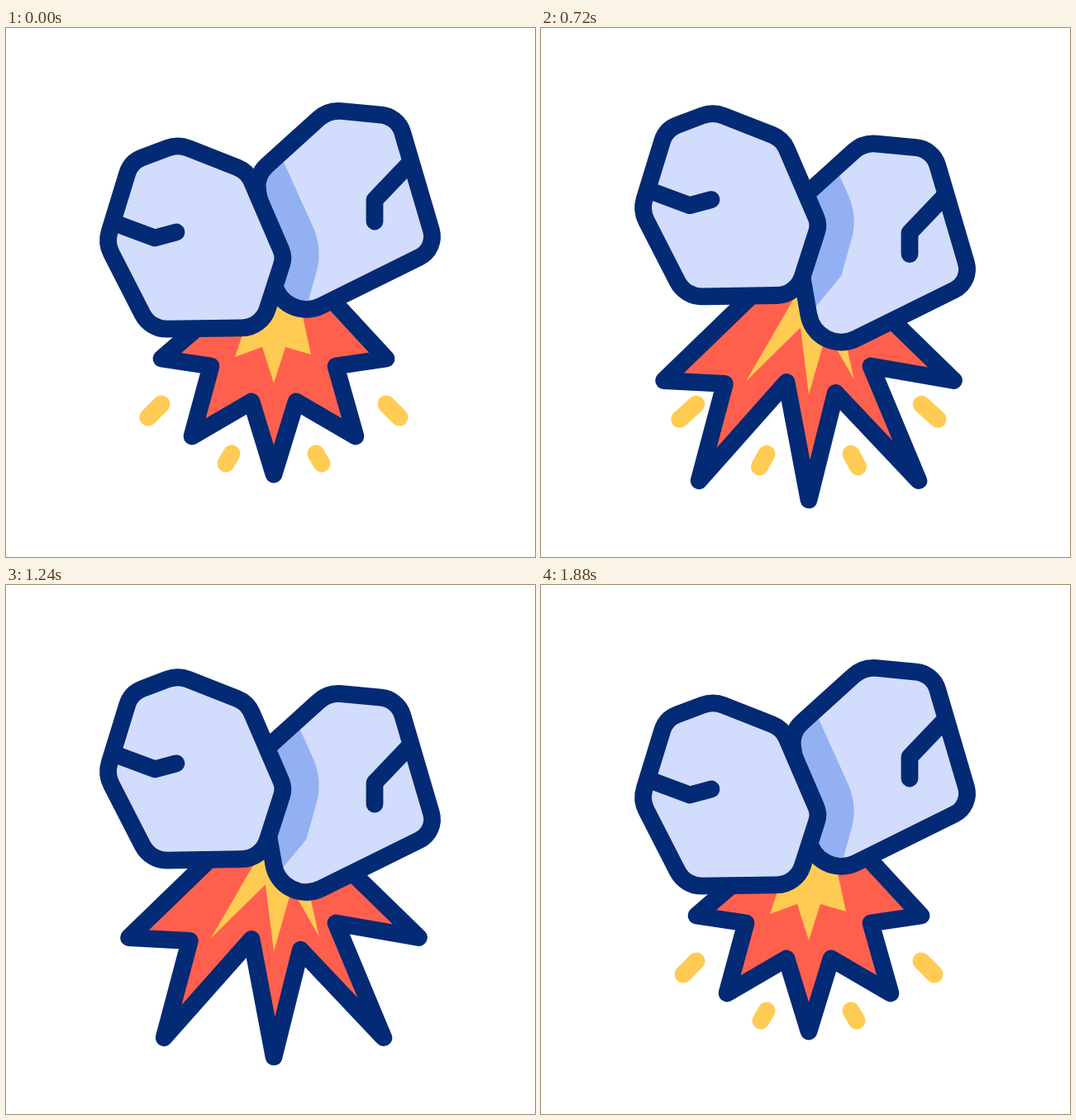
These frames come from a looping animation (640x640 px, 2.4 s). An HTML page with a canvas:

```html
<!DOCTYPE html>
<html lang="en">
<head>
<meta charset="utf-8">
<title>Striking stones</title>
<style>
html, body { margin: 0; width: 100%; height: 100%; overflow: hidden; background: #fff; }
canvas { display: block; width: 100%; height: 100%; }
</style>
</head>
<body>
<canvas id="stage" width="640" height="640"></canvas>
<script>
const ctx = document.getElementById('stage').getContext('2d');
const LOOP = 2400, ACTIVE = 1880, STEP = 20, BEAT = ACTIVE / 7;
const NAVY = '#032a74', STONE = '#d2dcfc', SHADE = '#93b1f2', RED = '#ff604e', GOLD = '#ffcb52';
const LINE = 20.8, MID = 324;

const mix = (a, b, k) => a + (b - a) * k;
const clamp = v => Math.max(0, Math.min(1, v));
const sine = u => (1 - Math.cos(Math.PI * clamp(u))) / 2;
const power = (u, n) => u < .5 ? (2 * u) ** n / 2 : 1 - (2 - 2 * u) ** n / 2;
const mirror = ([x, y]) => [2 * MID - x, y];

function polygon(pts) {
  const p = new Path2D();
  pts.forEach(([x, y]) => p.lineTo(x, y));
  return p;
}

// Closed polygon, each corner given as x, y, radius
function rounded(pts) {
  const p = new Path2D(), [a, b] = [pts[pts.length - 1], pts[0]];
  p.moveTo((a[0] + b[0]) / 2, (a[1] + b[1]) / 2);
  pts.forEach(([x, y, r], i) => {
    const n = pts[(i + 1) % pts.length];
    p.arcTo(x, y, n[0], n[1], r);
  });
  p.closePath();
  return p;
}

const leftStone = rounded([[208, 140.5, 35], [292, 173.5, 32], [336.5, 277, 25], [309, 362.5, 33],
  [174.5, 364.5, 33], [121, 260, 35], [151, 162, 30]]);
const rightStone = rounded([[390, 99, 36], [474, 107, 30], [521, 267, 28], [333, 360, 40], [301.5, 179, 34]]);
const leftCrack = polygon([[137, 238], [180, 254], [206, 247]]);
const rightCrack = polygon([[488, 164], [446, 208], [446, 234]]);
const shadow = new Path2D('M270 100L305 120Q325 140 335 160L372 242Q382 265 377 290L365 333Q364 339 360 343L331 378H270Z');

// A corner rests at x, y, moves by gx, gy as the fire opens and by dx, dy as it dips
const corner = (x, y, gx = 0, gy = 0, dx = 0, dy = 0) =>
  (open, dip) => [x + open * (gx + dx * dip), y + open * (gy + dy * dip)];
const flip = c => (open, dip) => mirror(c(open, dip));

const sideTip = corner(188, 400, -66, 18, 28, 9);
const lowTip = corner(225, 494, -68, 85, 36, -33);
const flame = [
  corner(316, 290, 4, 0, -32),
  sideTip, corner(248, 409, -19, 12, -7, 10),
  lowTip, corner(297, 452, 0, 1, 0, -26),
  corner(MID, 540, 0, 85, 0, -57), corner(351, 452, 12, 32, -7, -45),
  flip(lowTip), corner(399, 409),
  flip(sideTip), corner(352, 283)
];
const core = [
  corner(313, 290, 5, 0, 10),
  corner(277, 398, -29, 55, 0, -27), corner(310, 386, 1, -12, 3, -12),
  corner(MID, 430, 0, 36, 0, -24), corner(338, 386, 5, 29, 3, -50),
  corner(369, 395, 25, 71, -16, -43), corner(345, 285, -10, 0, 13)
];
const flares = [356, 889, 1369], FALL = 310;

// Each spark: inner end, outer end, vanishing point
const sparks = [[[188, 455], [172, 471], [81, 523]], [[273, 515], [266, 527], [231, 611.5]]];
const bursts = [0, 630, ACTIVE];

function ink(path, width = LINE, color = NAVY) {
  ctx.strokeStyle = color;
  ctx.lineWidth = width;
  ctx.stroke(path);
}

function fill(path, color) {
  ctx.fillStyle = color;
  ctx.fill(path);
}

// Stones swing from rest between both ends and back to rest
function swing(t, first, second) {
  const n = Math.min(6, Math.floor(t / BEAT));
  const at = k => k % 7 === 0 ? 0 : k % 2 ? first : second;
  return mix(at(n), at(n + 1), power(clamp(t / BEAT - n), 4));
}

// Zero at each flare, sinking after it and rising to the next
function dipAt(t) {
  const i = flares.filter(f => f <= t).length;
  if (!i) return 0;
  const low = flares[i - 1] + FALL;
  if (t < low || i === flares.length) return 1.1 * sine((t - low + FALL) / FALL);
  return 1.1 * (1 - sine((t - low) / (flares[i] - low)));
}

function drawFlame(t) {
  const open = sine(t / 360) * (1 - sine((t - 1660) / 220)), dip = dipAt(t);
  const shape = corners => polygon(corners.map(c => c(open, dip)));
  const outer = shape(flame);
  outer.closePath();
  fill(outer, RED);
  fill(shape(core), GOLD);
  ink(outer);
}

function drawSparks(t) {
  const start = bursts.find(b => t < b + 500);
  const age = t - start;
  const size = 21 * (age < 0 ? clamp(1 + age / 100) : clamp((460 - age) / 60));
  if (size <= 0) return;
  const head = power(clamp(age / 400), 3), tail = head * head;
  for (const [a, b, end] of sparks) {
    const from = a.map((v, i) => mix(v, end[i], tail));
    const to = b.map((v, i) => mix(v, end[i], head));
    to[0] += .01;
    ink(polygon([from, to]), size, GOLD);
    ink(polygon([from, to].map(mirror)), size, GOLD);
  }
}

function drawStones(t) {
  const left = swing(t, -47, 45), right = swing(t, 47.5, -47.5);
  ctx.save();
  ctx.translate(0, right);
  fill(rightStone, STONE);
  ctx.save();
  ctx.clip(rightStone);
  ctx.translate(0, left - right);
  fill(shadow, SHADE);
  ctx.restore();
  ink(rightCrack);
  ink(rightStone);
  ctx.restore();

  ctx.save();
  ctx.translate(0, left);
  fill(leftStone, STONE);
  ink(leftCrack);
  ink(leftStone);
  ctx.restore();
}

function draw(now) {
  const t = Math.min(ACTIVE, Math.floor(now % LOOP / STEP) * STEP);
  ctx.fillStyle = '#fff';
  ctx.fillRect(0, 0, 640, 640);
  ctx.lineCap = ctx.lineJoin = 'round';
  drawSparks(t);
  drawFlame(t);
  drawStones(t);
}

const begin = performance.now();
function tick() {
  draw(performance.now() - begin);
  requestAnimationFrame(tick);
}
tick();
</script>
</body>
</html>
```
